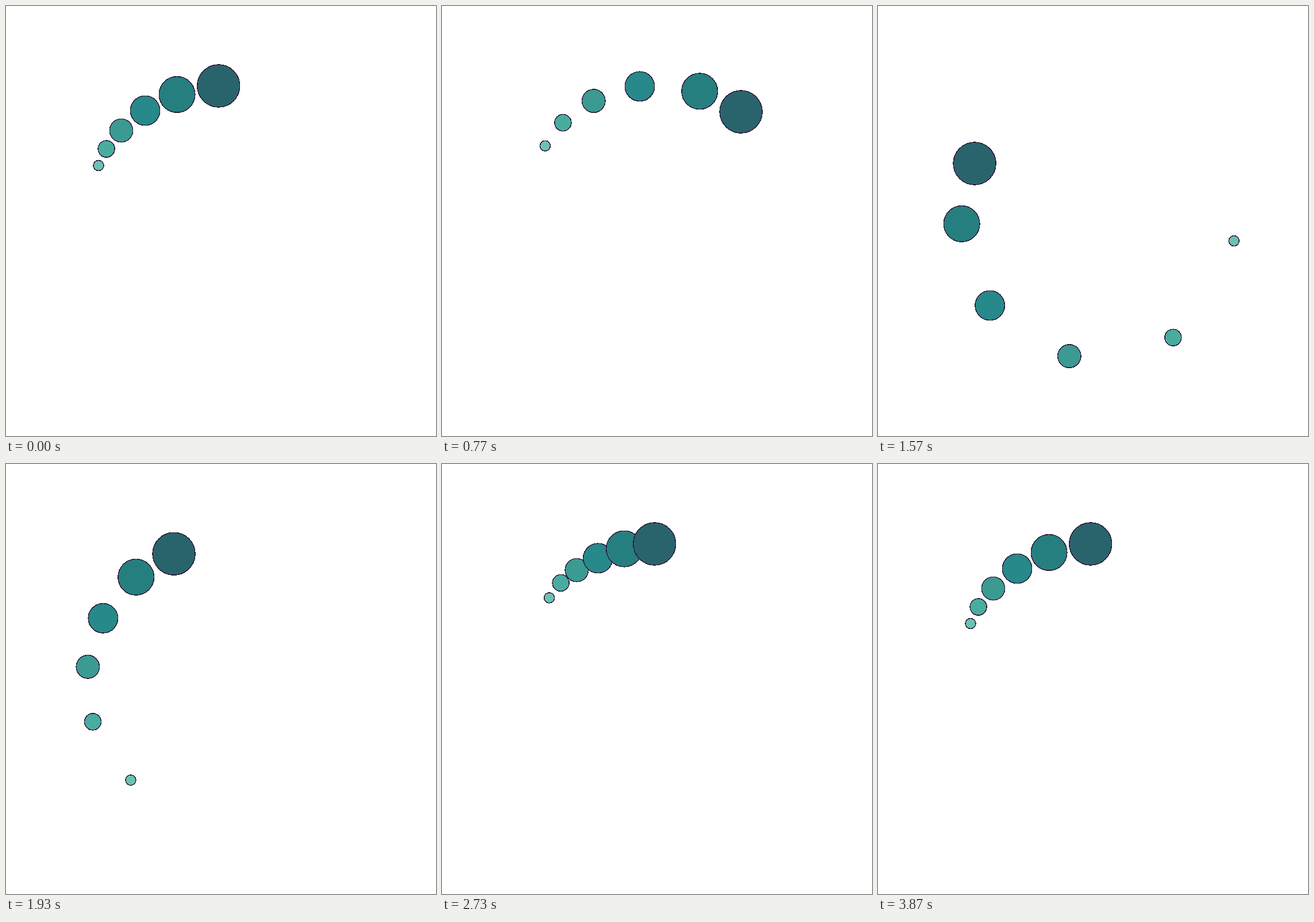
Write an HTML page that moves like this. It is 748x748 px and loops after 3.93 s.

```html
<!DOCTYPE html>
<html lang="en">
<head>
<meta charset="utf-8">
<title>Orbiting dots</title>
<style>
  html, body { margin: 0; width: 100%; height: 100%; overflow: hidden; background: #fff; }
  svg { display: block; width: 748px; height: 748px; }
  circle { stroke: #32183a; stroke-width: 1.5; shape-rendering: crispEdges; }
</style>
</head>
<body>
<svg id="stage" viewBox="0 0 748 748"></svg>
<script>
const LOOP = 3930, CX = 381.2, CY = 374.2;

// Angles in degrees clockwise from the top; start, span and end in ticks of 1/30 s.
// Each dot eases through a full turn plus "over", then settles back by "end".
const dots = [
  { r: 9,    orbit: 240.5, fill: '#68c3b2', rest: -66.3, over: 20.3, start: 10.25, span: 86.7, x1: .612, x2: .241, end: 112 },
  { r: 14.5, orbit: 241.8, fill: '#48ad9f', rest: -58.7, over: 15,   start: 8.22,  span: 81.9, x1: .628, x2: .26,  end: 113 },
  { r: 20.2, orbit: 239.8, fill: '#3b9a92', rest: -48.9, over: 11.9, start: 6.22,  span: 80.3, x1: .625, x2: .26,  end: 114 },
  { r: 25.7, orbit: 237.3, fill: '#278989', rest: -35.9, over: 8.45, start: 4.3,   span: 79.7, x1: .617, x2: .247, end: 116 },
  { r: 31.3, orbit: 235.6, fill: '#267f7f', rest: -20.8, over: 5,    start: 2.3,   span: 78.1, x1: .613, x2: .243, end: 117 },
  { r: 37,   orbit: 235.5, fill: '#29646c', rest: -2.8,  over: 0,    start: 6.1,   span: 71.1, x1: .534, x2: .22,  end: 117 }
];

const clamp = v => Math.min(1, Math.max(0, v));
const smooth = s => s * s * (3 - 2 * s);

// Same as cubic-bezier(x1, 0, x2, 1)
function ease(x, x1, x2) {
  let lo = 0, hi = 1;
  for (let i = 0; i < 30; i++) {
    const s = (lo + hi) / 2, q = 1 - s;
    if (3 * x1 * s * q * q + 3 * x2 * s * s * q + s * s * s < x) lo = s;
    else hi = s;
  }
  return smooth((lo + hi) / 2);
}

function angleAt(d, tick) {
  if (tick >= d.end) return d.rest;
  const peak = d.start + d.span;
  if (tick > peak) return d.rest + d.over * (1 - smooth((tick - peak) / (d.end - peak)));
  const x = clamp((tick - d.start) / d.span);
  return x ? d.rest + (360 + d.over) * ease(x, d.x1, d.x2) : d.rest;
}

const stage = document.getElementById('stage');
for (const d of dots) {
  d.el = document.createElementNS('http://www.w3.org/2000/svg', 'circle');
  d.el.setAttribute('r', d.r);
  d.el.setAttribute('fill', d.fill);
  stage.append(d.el);
}

function draw(ms) {
  // 30 steps a second, with step times rounded to 10 ms
  const tick = Math.floor((Math.floor(ms / 10) + .5) * .3);
  for (const d of dots) {
    const a = angleAt(d, tick) * Math.PI / 180;
    d.el.setAttribute('cx', (CX + d.orbit * Math.sin(a)).toFixed(2));
    d.el.setAttribute('cy', (CY - d.orbit * Math.cos(a)).toFixed(2));
  }
}

const t0 = performance.now();
function loop() {
  draw((performance.now() - t0) % LOOP);
  requestAnimationFrame(loop);
}
draw(0);
requestAnimationFrame(loop);
</script>
</body>
</html>
```
